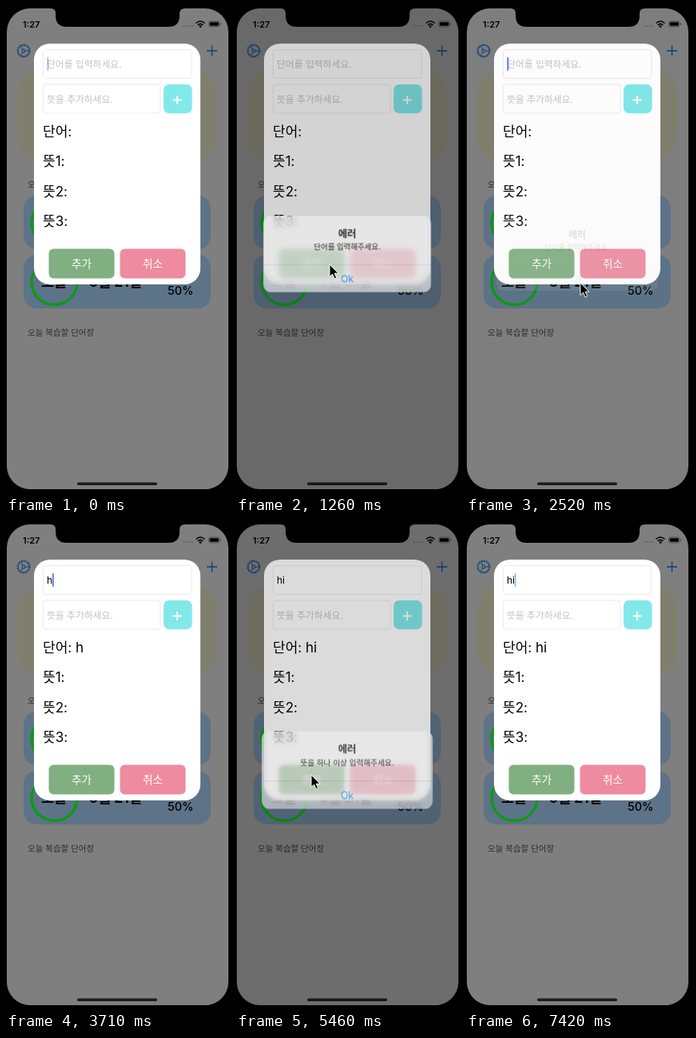
These frames come from a looping animation (280 by 610 pixels, 7.49 s). An HTML page:

```html
<!DOCTYPE html>
<html lang="ko">
<meta charset="utf-8">
<style>
html, body { margin: 0; width: 100%; height: 100%; overflow: hidden; background: #000 }
body > * { position: absolute; left: 0; top: 0 }
svg { display: block; font-family: Inter, "Noto Sans CJK KR", sans-serif }
#shade { width: 280px; height: 610px; background: #000; clip-path: inset(3px 1px 6px 1px round 29px) }
#alert {
  left: 38px; top: 263.5px; width: 202px; height: 91.5px; border-radius: 9px; overflow: hidden;
  background: rgba(240, 240, 240, .82)
}
.mid { text-anchor: middle }
.field { fill: #fff; stroke: #ebebeb }
.hint { fill: #c3c3c6; font-size: 11.8px }
</style>
<body>
<svg width="280" height="610">
  <rect x="1" y="3" width="277" height="601" rx="29" fill="#7f7f7f"/>
  <path d="M56 0H224V3Q217 3 217 9V12Q217 26 203 26H76Q62 26 62 12V9Q62 3 56 3Z"/>
  <text x="21" y="27" font-size="11" font-weight="600">1:27</text>
  <g fill="#606060">
    <circle cx="222.500" cy="25" r="1"/><circle cx="226" cy="25" r="1"/>
    <circle cx="229.500" cy="25" r="1"/><circle cx="233" cy="25" r="1"/>
  </g>
  <g fill="none" stroke="#000" stroke-width="1.600">
    <path d="M237.500 21.500Q243 16.500 248.500 21.500M239.700 23.800Q243 20.800 246.300 23.800"/>
    <circle cx="243" cy="25.500" r=".7"/>
    <rect x="253.500" y="19" width="13.500" height="7" rx="2" stroke="#444" stroke-width=".8"/>
  </g>
  <rect x="254.700" y="20.200" width="11.100" height="4.600" rx="1"/>
  <path d="M268.500 21.500v2" stroke="#444"/>
  <g fill="none" stroke="#0a3f7c">
    <circle cx="22" cy="56" r="7"/>
    <circle cx="22" cy="56" r="8" stroke-width="1.200" stroke-dasharray="1.600 1.540"/>
    <circle cx="22" cy="56" r="2"/>
    <path d="M24 56h4.500M21 54.300l-2.300-4M21 57.700l-2.300 4"/>
    <path d="M251 56h13M257.500 49.500v13" stroke-width="1.300"/>
  </g>
  <rect x="14" y="77" width="250" height="118" rx="34" fill="#807e6d"/>
  <g font-size="10.500" fill="#2c2c2c">
    <text x="27" y="227">오늘의 단어장</text>
    <text x="27" y="412">오늘 복습할 단어장</text>
  </g>
  <g fill="#5d7388">
    <rect x="22" y="237" width="234" height="67" rx="16"/>
    <rect x="22" y="311" width="234" height="67" rx="16"/>
  </g>
  <g fill="none" stroke="#0c9a15" stroke-width="3.400">
    <circle cx="60.500" cy="271" r="28.500"/><circle cx="60.500" cy="345" r="28.500"/>
  </g>
  <g font-weight="700" font-size="17.500">
    <text class="mid" x="60" y="351">오늘</text>
    <text x="104" y="351">5월 21일</text>
    <text x="202" y="361" font-size="14.500" font-weight="500">50%</text>
  </g>
  <rect x="89" y="595.500" width="100" height="3.500" rx="1.700" fill="#1c1c1c"/>

  <rect x="35" y="47" width="208" height="301" rx="20" fill="#fff"/>
  <rect class="field" x="46.500" y="54.500" width="185.500" height="36" rx="3"/>
  <rect class="field" x="46.500" y="98" width="146.500" height="36" rx="3"/>
  <text id="hint" class="hint" x="51" y="77">단어를 입력하세요.</text>
  <text class="hint" x="51" y="120.500">뜻을 추가하세요.</text>
  <text id="typed" x="51" y="77" font-size="12"></text>
  <rect id="caret" y="64" width="1.600" height="17" rx=".8" fill="#4273d8"/>
  <rect x="196.500" y="97.500" width="37" height="38" rx="8" fill="#ecfbfb"/>
  <rect x="197" y="98" width="35.500" height="36" rx="7" fill="#82e8ea"/>
  <path d="M208.500 117.500h11M214 112v11" stroke="#fff" stroke-width="1.800"/>
  <g font-size="17">
    <text id="word" x="46" y="162.500"></text>
    <text x="46" y="200">뜻1:</text><text x="46" y="237.500">뜻2:</text><text x="46" y="275">뜻3:</text>
  </g>
  <rect x="53.500" y="303.500" width="82" height="37" rx="6" fill="#80af81"/>
  <rect x="142.500" y="303.500" width="82" height="37" rx="6" fill="#ee8b9f"/>
  <g class="mid" font-size="13.600" fill="#fff">
    <text id="add" x="94.500" y="326.500">추가</text><text x="183.500" y="326.500">취소</text>
  </g>
</svg>
<div id="shade"></div>
<div id="alert">
  <svg class="mid" width="202" height="91.500" viewBox="38 263.500 202 91.500">
    <rect id="press" x="38" y="322.500" width="203" height="33" fill="#000" fill-opacity=".1"/>
    <path d="M38 322.500H241" stroke="#000" stroke-opacity=".18" stroke-width=".6"/>
    <text x="139" y="289.300" font-size="11.800" font-weight="600">에러</text>
    <text id="message" x="139" y="304.300" font-size="9.100"></text>
    <text x="139" y="344" font-size="11.800" fill="#1684e8">Ok</text>
  </svg>
</div>
<svg width="280" height="610">
  <path id="cursor" d="M0 0V15.500L3.600 12.200 6.100 17.800 8.700 16.700 6.200 11.200H11Z" stroke="#fff"/>
</svg>
<script>
const LOOP = 7490;
const el = id => document.getElementById(id);
const clamp = v => Math.min(1, Math.max(0, v));
const between = (t, a, b) => t >= a && t < b;

const alerts = [
  { open: 1110, close: 2335, down: 2090, press: 960, text: '단어를 입력해주세요.' },
  { open: 5340, close: 6420, down: 6345, press: 5110, text: '뜻을 하나 이상 입력해주세요.' }
];
// [time, x, y] of the pointer tip
const path = [
  [480, 126, 612], [900, 117, 323], [1660, 117, 323], [1960, 142, 346], [2660, 143, 346],
  [2950, 92, 299], [4790, 92, 298], [5040, 94, 316], [6220, 94, 316], [6420, 128, 332],
  [6860, 128, 332], [7140, 132, 612]
];
// moments at which the caret starts a fresh blink
const blinkStarts = [-900, 2440, 3710, 3850, 6510];

// critically damped spring from 0 to 1
function spring(ms) {
  const x = Math.max(0, ms) * .0205;
  return 1 - (1 + x) * Math.exp(-x);
}

function pointer(t) {
  const i = path.findIndex(p => p[0] > t);
  if (i < 1) return path[i ? path.length - 1 : 0].slice(1);
  const [t0, x0, y0] = path[i - 1], [t1, x1, y1] = path[i];
  const u = (t - t0) / (t1 - t0), e = u * u * (3 - 2 * u);
  return [x0 + (x1 - x0) * e, y0 + (y1 - y0) * e];
}

function caretAlpha(t) {
  if (alerts.some(a => between(t, a.open, a.close))) return 0;
  const phase = (t - blinkStarts.filter(s => s <= t).pop()) % 980;
  return phase < 800 ? 1 - clamp((phase - 470) / 150) : clamp((phase - 830) / 140);
}

function render(t) {
  const typed = t < 3710 ? '' : t < 3850 ? 'h' : 'hi';
  el('typed').textContent = typed;
  el('word').textContent = '단어: ' + typed;
  el('hint').style.opacity = typed ? 0 : 1;
  el('caret').setAttribute('x', [51.5, 58, 60.8][typed.length]);
  el('caret').style.opacity = caretAlpha(t);

  const a = alerts[t < 4000 ? 0 : 1];
  const shown = spring(t - a.open), alpha = shown * (1 - spring(t - a.close));
  const box = el('alert').style;
  el('message').textContent = a.text;
  el('shade').style.opacity = .23 * alpha ** 1.4;
  box.opacity = alpha;
  box.visibility = alpha > .004 ? 'visible' : 'hidden';
  box.backdropFilter = `blur(${8 * alpha ** 3}px)`;
  box.transform = `scale(${1 + .2 * (1 - shown)})`;
  el('press').style.opacity = between(t, a.down, a.close) ? 1 : 0;
  el('add').style.opacity = between(t, a.press, a.open) ? .4 : 1;

  el('cursor').setAttribute('transform', `translate(${pointer(t)})`);
  el('cursor').style.opacity = between(t, 3000, 4340) ? 0 : 1;
}

function tick() {
  render(performance.now() % LOOP);
  requestAnimationFrame(tick);
}
tick();
</script>
</body>
</html>
```
